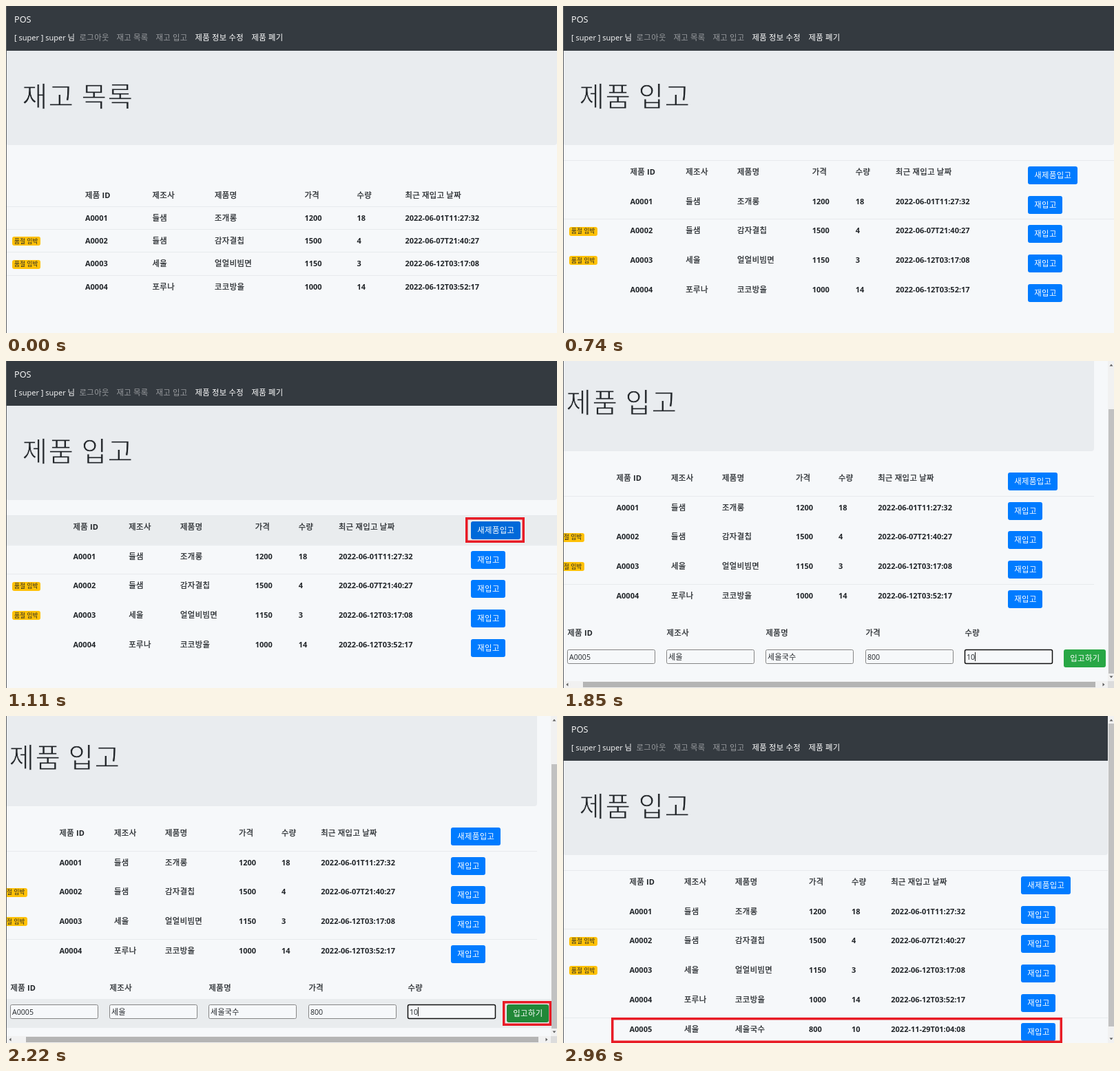
Write an HTML page that moves like this. It is 800 px wide and 475 px high and loops after 3330 ms.

```html
<!DOCTYPE html>
<html lang="ko">
<head>
<meta charset="utf-8">
<title>POS</title>
<style>
  html, body { margin: 0; width: 100%; height: 100%; overflow: hidden; background: #f6f8fa; }
  svg { display: block; width: 800px; height: 475px; }
  text { font-family: "Open Sans", "Noto Sans CJK KR", "Noto Sans CJK", sans-serif; font-size: 11px; fill: #212529; white-space: pre; }
  .ko { font-family: "Noto Sans CJK KR", "Noto Sans CJK", sans-serif; font-size: 1.03em; letter-spacing: .035em; }
  .bold { font-weight: 700; }
  .bold .ko { font-weight: 500; stroke: #212529; stroke-width: .25px; }
  /* the outline in the panel colour thins the strokes */
  .title { font-size: 38.6px; font-weight: 300; stroke: #e9ecef; stroke-width: .9px; }
  .brand { font-size: 12.7px; fill: #fff; }
  .white { fill: #fff; }
  .dim { fill: #999c9f; }
  .lit { fill: #ccced0; }
  .tag { font-size: 8.3px; font-weight: 700; }
  .tag .ko { font-weight: 500; }
  .field { font-size: 10.6px; }
</style>
</head>
<body>
<svg id="stage" viewBox="0 0 800 475"></svg>
<script>
const STEP = 370;
const PAGE = "#f6f8fa";
const HEAD = ["제품 ID", "제조사", "제품명", "가격", "수량", "최근 재입고 날짜"];
const ITEMS = [
  ["A0001", "들샘", "조개롱", "1200", "18", "2022-06-01T11:27:32"],
  ["A0002", "들샘", "감자결칩", "1500", "4", "2022-06-07T21:40:27"],
  ["A0003", "세울", "얼얼비빔면", "1150", "3", "2022-06-12T03:17:08"],
  ["A0004", "포루나", "코코방울", "1000", "14", "2022-06-12T03:52:17"],
  ["A0005", "세울", "세울국수", "800", "10", "2022-11-29T01:04:08"]
];
const LIST_COLS = [115, 212.5, 303, 433.5, 509.5, 579.5];
const WIDE_COLS = [97.5, 178.3, 253, 361.7, 424.8, 483];
const SLIM_COLS = [96.5, 176, 250, 357, 419, 476.3];
const ROW = 42.7, TOP = 224;

const rect = (x, y, w, h, fill, r = 0, extra = "") =>
  `<rect x="${x}" y="${y}" width="${w}" height="${h}" fill="${fill}" rx="${r}" ${extra}/>`;

// y is the vertical centre of the line
const text = (x, y, s, cls = "", rise = 4) =>
  `<text x="${x}" y="${Math.round(y + rise)}" class="${cls}">` +
  s.replace(/[가-힣]+/g, '<tspan class="ko">$&</tspan>') + "</text>";

const rule = (y, w) => rect(0, Math.round(y), w, 1, "#e7eaed");

const button = (x, y, w, label, fill) =>
  rect(x, Math.round(y), w, 26, fill, 3) + text(x + 9.3, y + 13, label, "white");

const badge = y =>
  rect(9, Math.round(y - 5.8), 41, 13, "#ffc107", 3) + text(12, y + .6, "품절 임박", "tag", 3);

const mark = (x, y, w, h) =>
  rect(x + 1.75, y + 1.75, w - 3.5, h - 3.5, "none", 0, 'stroke="#e81c26" stroke-width="3.5"');

const cells = (cols, y, row) => row.map((s, i) => text(cols[i], y, s, "bold")).join("");

const arrow = (x, y, turn) =>
  `<path d="M-2.5 1.5L0 -1.5L2.5 1.5z" fill="#606060" transform="translate(${x} ${y}) rotate(${turn})"/>`;

function header(title, w, lit) {
  return rect(0, 0, w, 65, "#343a40") +
    text(12, 19.5, "POS", "brand", 4.5) +
    text(12, 45.5, "[ super ] super 님", "white") +
    text(106.5, 45.5, "로그아웃", "dim") +
    text(160.5, 45.5, "재고 목록", "dim") +
    text(217.5, 45.5, "재고 입고", lit ? "lit" : "dim") +
    text(274.5, 45.5, "제품 정보 수정", "white") +
    text(356.5, 45.5, "제품 폐기", "white") +
    rect(0, 65, w, 137, "#e9ecef", 4) + rect(0, 65, w, 8, "#e9ecef") +
    text(23.5, 131, title, "title", 15);
}

function listPage(lit) {
  let out = header("재고 목록", 800, lit) + cells(LIST_COLS, 274.5, HEAD);
  ITEMS.slice(0, 4).forEach((row, i) => {
    const y = 308 + i * 33.2;
    out += rule(y - 17, 800) + cells(LIST_COLS, y, row);
    if (i === 1 || i === 2) out += badge(y);
  });
  return out;
}

function stockPage({ w = 800, cols = WIDE_COLS, bx = 675, count = 4, lines = [0, 2], hover = false }) {
  let out = header("제품 입고", w);
  if (hover) out += rect(0, TOP, w, ROW, "#e9ecee");
  out += lines.map(i => rule(TOP + i * ROW, w)).join("");
  out += cells(cols, TOP + 17, HEAD) +
    button(bx, TOP + 8.9, 72, "새제품입고", hover ? "#0069d9" : "#007bff");
  ITEMS.slice(0, count).forEach((row, i) => {
    const y = TOP + (i + 1) * ROW;
    out += cells(cols, y + 17, row) + button(bx, y + 8.9, 50, "재입고", "#007bff");
    if (i === 1 || i === 2) out += badge(y + 17);
  });
  return out;
}

const vBar = (h, y, len) =>
  rect(791, 0, 9, h, "#f1f1f1") + rect(792, y, 8, len, "#c1c1c1") +
  arrow(796, 6, 0) + arrow(796, h - 6, 180);

const hBar = thumb =>
  rect(0, 465, 791, 10, "#f1f1f1") + rect(791, 465, 9, 10, "#dcdcdc") +
  rect(29, 466, 744, 8, thumb) + arrow(6, 470, 270) + arrow(785, 470, 90);

function formPage(filled, hover) {
  const values = ITEMS[4];
  let out = `<g transform="translate(-19 -71)">` +
    stockPage({ w: 790, cols: SLIM_COLS, bx: 665, lines: [1, 4] }) + "</g>";
  if (hover) out += rect(0, 411, 791, 42, "#e9ecee");
  HEAD.slice(0, 5).forEach((label, i) => {
    const x = Math.round(6 + i * 144.2), focus = filled && i === 4;
    out += text(x + .5, 394.5, label, "bold") +
      rect(x + .5, 419.5, 127, 20, PAGE, 2,
        focus ? 'stroke="#101010" stroke-width="1.5"' : 'stroke="#858585"');
    if (filled) out += text(x + 3, 430, values[i], "field");
    if (focus) out += rect(x + 15, 423, 1, 13, "#222");
  });
  return out + button(727, 419, 61, "입고하기", hover ? "#218838" : "#28a745") +
    vBar(465, 70, 384) + hBar(filled ? "#b4b4b4" : "#a8a8a8");
}

const resultPage = () =>
  stockPage({ w: 791, cols: SLIM_COLS, bx: 665, count: 5, lines: [0, 2, 5] }) + vBar(475, 11, 440);

const scenes = [
  listPage(false),
  listPage(true) + mark(211, 32, 60, 28),
  stockPage({}),
  stockPage({ lines: [0, 1, 2], hover: true }) + mark(667, 227, 86, 37),
  formPage(false, false),
  formPage(true, false),
  formPage(true, true) + mark(721, 414, 71, 36),
  resultPage(),
  resultPage() + mark(70, 438, 655, 37)
];

const stage = document.getElementById("stage");
stage.innerHTML = scenes.map(s => `<g display="none">${s}</g>`).join("") +
  rect(0, 0, 1, 475, "#5a5e62");
const groups = [...stage.children].slice(0, scenes.length);
const start = performance.now();
let shown = -1;

function draw() {
  const elapsed = Math.max(0, performance.now() - start);
  const next = Math.floor(elapsed / STEP) % scenes.length;
  if (next !== shown) {
    groups.forEach((g, i) => g.setAttribute("display", i === next ? "inline" : "none"));
    shown = next;
  }
  requestAnimationFrame(draw);
}
draw();
</script>
</body>
</html>
```
